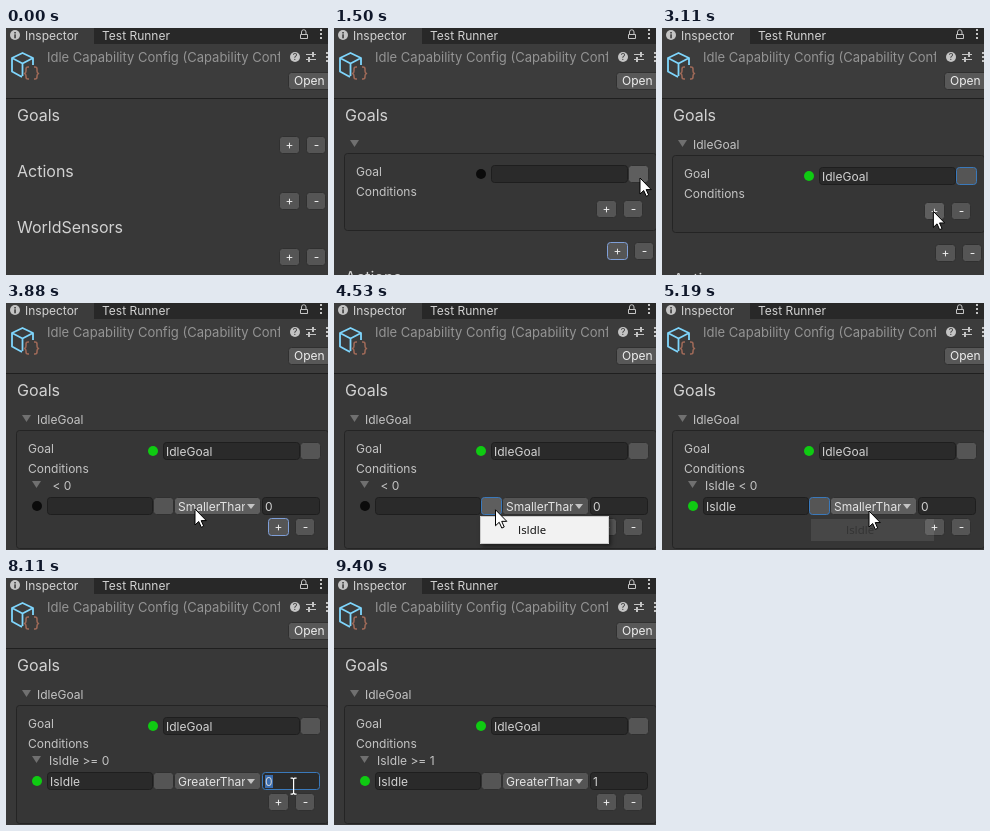
An HTML page with a canvas for the animation above (9.44 s loop, 322 by 247 pixels).

```html
<!DOCTYPE html>
<html lang="en">
<head>
<meta charset="utf-8">
<title>Inspector</title>
<style>
html, body { margin: 0; width: 100%; height: 100%; overflow: hidden; background: #383838; }
canvas { display: block; width: 322px; height: 247px; }
</style>
</head>
<body>
<canvas id="stage" width="322" height="247"></canvas>
<script>
const LOOP = 9440;
const c = document.getElementById('stage').getContext('2d');
const UI = 'Inter, "Liberation Sans", sans-serif';
const MENU = '"Open Sans", "Noto Sans", sans-serif';
const INK = '#c4c4c4', BLUE = '#3a79bb', GLOW = '#7f9fd8', ROW = 22;

// Pointer path: time, x, y
const path = [
  [0, 250, 262], [200, 250, 246], [700, 283, 119], [1110, 285, 132], [1500, 306, 150],
  [1780, 306, 150], [2160, 282, 168], [2320, 282, 168], [2520, 280, 167],
  [3190, 271, 184], [3360, 271, 184], [3880, 189, 206], [4280, 154, 203],
  [4490, 154, 203], [4650, 200, 226], [4860, 200, 226], [5190, 207, 208],
  [5340, 208, 208], [5800, 222, 250], [6540, 240, 262], [6790, 262, 246],
  [7230, 285, 207], [8070, 285, 207], [8150, 290, 209], [8360, 290, 209],
  [8650, 294, 262], [LOOP, 294, 262]
];

function pointerAt(t) {
  const i = path.findIndex((p, k) => k && t <= p[0]);
  const [a, b] = [path[i - 1], path[i]];
  const u = (t - a[0]) / (b[0] - a[0]), e = u * u * (3 - 2 * u);
  return { x: a[1] + (b[1] - a[1]) * e, y: a[2] + (b[2] - a[2]) * e };
}

function box(x, y, w, h, fill, line) {
  c.beginPath();
  c.roundRect(x + .5, y + .5, w - 1, h - 1, 3);
  c.fillStyle = fill;
  c.fill();
  c.strokeStyle = line;
  c.lineWidth = 1;
  c.stroke();
}

function fill(x, y, w, h, color) {
  c.fillStyle = color;
  c.fillRect(x, y, w, h);
}

function text(s, x, y, size = 12, color = INK, family = UI, align = 'left') {
  c.font = `${size}px ${family}`;
  c.textAlign = align;
  c.fillStyle = color;
  c.fillText(s, x, y);
}

function clipped(x, y, w, h, draw) {
  c.save();
  c.beginPath();
  c.rect(x, y, w, h);
  c.clip();
  draw();
  c.restore();
}

function disc(x, y, r, color) {
  c.beginPath();
  c.arc(x, y, r, 0, 7);
  c.fillStyle = color;
  c.fill();
}

function poly(pts, color, line) {
  c.beginPath();
  pts.forEach(([x, y]) => c.lineTo(x, y));
  c.closePath();
  c.fillStyle = color;
  c.fill();
  if (line) { c.strokeStyle = line; c.stroke(); }
}

function stroke(d, color, width) {
  c.strokeStyle = color;
  c.lineWidth = width;
  c.stroke(new Path2D(d));
}

const arrow = (x, y, color = '#707070', w = 9, h = 7) =>
  poly([[x, y], [x + w, y], [x + w / 2, y + h]], color);

const inside = (p, x, y, w, h) => p.x >= x && p.x < x + w && p.y >= y && p.y < y + h;

function button(x, y, w, h, p, line) {
  box(x, y, w, h, inside(p, x, y, w, h) ? '#5e5e5e' : '#555', line || '#303030');
}

function plusMinus(x, y, p, focused) {
  [['+', x], ['-', x + 27]].forEach(([sign, left], i) => {
    button(left, y, i ? 20 : 21, 18, p, !i && focused && GLOW);
    text(sign, left + 10.5, y + 13, 12, '#eee', UI, 'center');
  });
}

function field(x, y, w, value, p, line) {
  box(x, y, w, 18, '#2a2a2a', line || (inside(p, x, y, w, 18) ? '#656565' : '#1e1e1e'));
  text(value, x + 3, y + 14, 12, '#d2d2d2');
}

function picker(x, y, p, focused) {
  button(x, y, 21, 18, p, focused && BLUE);
}

// The label is mixed towards the panel grey, so a fading row blends as one layer.
function menuItem(label, x, y, w, color, alpha = 1) {
  c.globalAlpha = alpha;
  fill(x, y, w, ROW, color);
  c.globalAlpha = 1;
  const v = 56 - 50 * alpha;
  text(label, x + 35, y + 15, 11.4, `rgb(${v} ${v} ${v})`, MENU);
}

function menu(items, x, y, w, p) {
  const h = items.length * ROW + 6;
  c.save();
  c.shadowColor = 'rgba(0,0,0,.5)';
  c.shadowBlur = 4;
  c.shadowOffsetX = c.shadowOffsetY = 2;
  fill(x, y, w, h, '#f2f2f2');
  c.restore();
  c.lineWidth = 1;
  c.strokeStyle = '#ccc';
  c.strokeRect(x + .5, y + .5, w - 1, h - 1);
  items.forEach((label, i) => {
    const top = y + 3 + i * ROW;
    menuItem(label, x + 3, top, w - 6, inside(p, x, top, w, ROW) ? '#dadada' : '#f2f2f2');
  });
}

// A menu stays open until the pick, then the chosen item fades away.
function pickMenu(t, open, pick, label, x, y, w, p) {
  if (t >= open && t < pick) menu([label], x, y, w, p);
  const u = (t - pick) / 350;
  if (u >= 0 && u < 1) menuItem(label, x + 3, y + 3, w - 6, '#dadada', 1 - u * u);
}

function header() {
  fill(0, 0, 322, 16, '#282828');
  fill(0, 0, 88, 16, '#3c3c3c');
  fill(0, 16, 322, 54, '#3c3c3c');
  fill(0, 70, 322, 1, '#1f1f1f');
  disc(9, 7, 5, INK);
  fill(8.3, 4, 1.5, 1.5, '#333');
  fill(8.3, 6.3, 1.5, 4, '#333');
  text('Inspector', 19, 12, 12, '#d2d2d2');
  text('Test Runner', 96, 12, 12, '#d2d2d2');
  stroke('M295.5 6V4a2.2 2.2 0 0 1 4.5 0V6M294.5 6.5h7v4h-7z', INK, 1);
  [2, 6, 10].forEach(y => fill(314, y - 1, 2, 2, INK));

  c.lineJoin = 'round';
  stroke('M16 49L6 43.5V30L16.5 25L27 30V37M6 30L16.5 35.5L27 30M16.5 35.5V48', '#7fd6fd', 1.8);
  stroke('M23 39h-1q-2 0-2 2v2q0 2-1.5 2.5q1.5 .5 1.5 2.5v1q0 2 2 2h1M28 39h1q2 0 2 2v2q0 2 1.5 2.5q-1.5 .5-1.5 2.5v1q0 2-2 2h-1',
    '#a06a58', 1.5);
  clipped(40, 18, 234, 24, () =>
    text('Idle Capability Config (Capability Config)', 41, 34, 13, '#949494'));

  disc(289, 29, 5, INK);
  text('?', 289, 32, 9, '#333', UI, 'center');
  stroke('M300 26.5h10M300 31.5h10', INK, 1);
  fill(306, 24, 2, 5, INK);
  fill(302, 29, 2, 5, INK);
  [25, 29, 33].forEach(y => fill(320, y - 1, 2, 2, INK));
  box(282, 44, 44, 18, '#585858', '#303030');
  text('Open', 288, 57, 12, '#eee');
}

function pointer({ x, y }, beam) {
  c.lineJoin = 'miter';
  if (beam) {
    stroke(`M${x - 3} ${y - 8}h2l1 1l1-1h2M${x} ${y - 7}v14M${x - 3} ${y + 8}h2l1-1l1 1h2`, '#fff', 1.2);
    return;
  }
  c.lineWidth = 1;
  const shape = [[0, 0], [0, 16], [3.7, 12.5], [6.3, 18.3], [8.7, 17.2], [6.2, 11.6], [11.3, 11.6]];
  poly(shape.map(([a, b]) => [x + a, y + b]), '#fff', '#000');
}

const focusSteps = [[900, ''], [1780, 'goal+'], [3360, 'goalPick'], [4320, 'cond+'],
  [5340, 'condPick'], [7130, 'compare'], [9400, 'value'], [LOOP, '']];

function draw(t) {
  const p = pointerAt(t);
  const focus = focusSteps.find(([end]) => t < end)[1];
  const added = t >= 900, named = t >= 2320, hasCond = t >= 3360;
  const keyed = t >= 4860, greater = t >= 6540, value = t >= 8360 ? '1' : '0';
  const dy = named ? 2 : 0, grow = hasCond ? 41 : 0;
  const shift = added ? 106 + dy + grow : 0;

  fill(0, 0, 322, 247, '#383838');
  header();

  ['Goals', 'Actions', 'WorldSensors'].forEach((name, i) => {
    const y = i * 56;
    text(name, 11, 93 + y + (i ? shift : 0), 16, '#d2d2d2');
    plusMinus(273, 108 + y + shift, p, !i && focus === 'goal+');
  });

  if (added) {
    arrow(16, 112);
    if (named) text('IdleGoal', 31, 121);
    box(10, 125 + dy, 313, 78 + grow, '#363636', '#242424');
    text('Goal', 22, 148 + dy);
    text('Conditions', 22, 168 + dy);
    disc(147, 146 + dy, 5, named ? '#0fcb12' : '#0b0b0b');
    field(157, 137 + dy, 137, named ? 'IdleGoal' : '', p);
    picker(294, 137 + dy, p, focus === 'goalPick');
    plusMinus(262, 172 + dy + grow, p, focus === 'cond+');
  }

  if (hasCond) {
    arrow(26, 178);
    text(`${keyed ? 'IsIdle' : ''} ${greater ? '>=' : '<'} ${value}`, 43, 187);
    disc(31, 203, 5, keyed ? '#0fcb12' : '#0b0b0b');
    field(41, 194, 106, keyed ? 'IsIdle' : '', p);
    picker(147, 194, p, focus === 'condPick');
    button(168, 194, 87, 18, p, focus === 'compare' && BLUE);
    clipped(170, 195, 69, 16, () =>
      text(greater ? 'GreaterThanOrEqual' : 'SmallerThan', 172, 208, 12, '#e4e4e4'));
    arrow(241, 201, INK, 8, 5);
    field(256, 194, 58, '', p, focus === 'value' && BLUE);
    if (focus === 'value') {
      if (value === '0') fill(259, 197, 8, 13, '#3a6cae');
      else fill(265, 197, 1, 13, '#d2d2d2');
    }
    text(value, 259, 208, 12, '#d2d2d2');
  }

  pickMenu(t, 1780, 2320, 'IdleGoal', 189, 155, 136, p);
  pickMenu(t, 4320, 4860, 'IsIdle', 146, 213, 129, p);
  if (t >= 5340 && t < 6540) {
    menu(['SmallerThan', 'SmallerThanOrEqual', 'GreaterThan', 'GreaterThanOrEqual'], 166, 213, 153, p);
    stroke('M176 226l3 3l6-6', '#111', 1.3);
  }

  pointer(p, t > 6800 && inside(p, 256, 194, 58, 18));
}

function tick() {
  draw(performance.now() % LOOP);
  requestAnimationFrame(tick);
}
tick();
</script>
</body>
</html>
```
